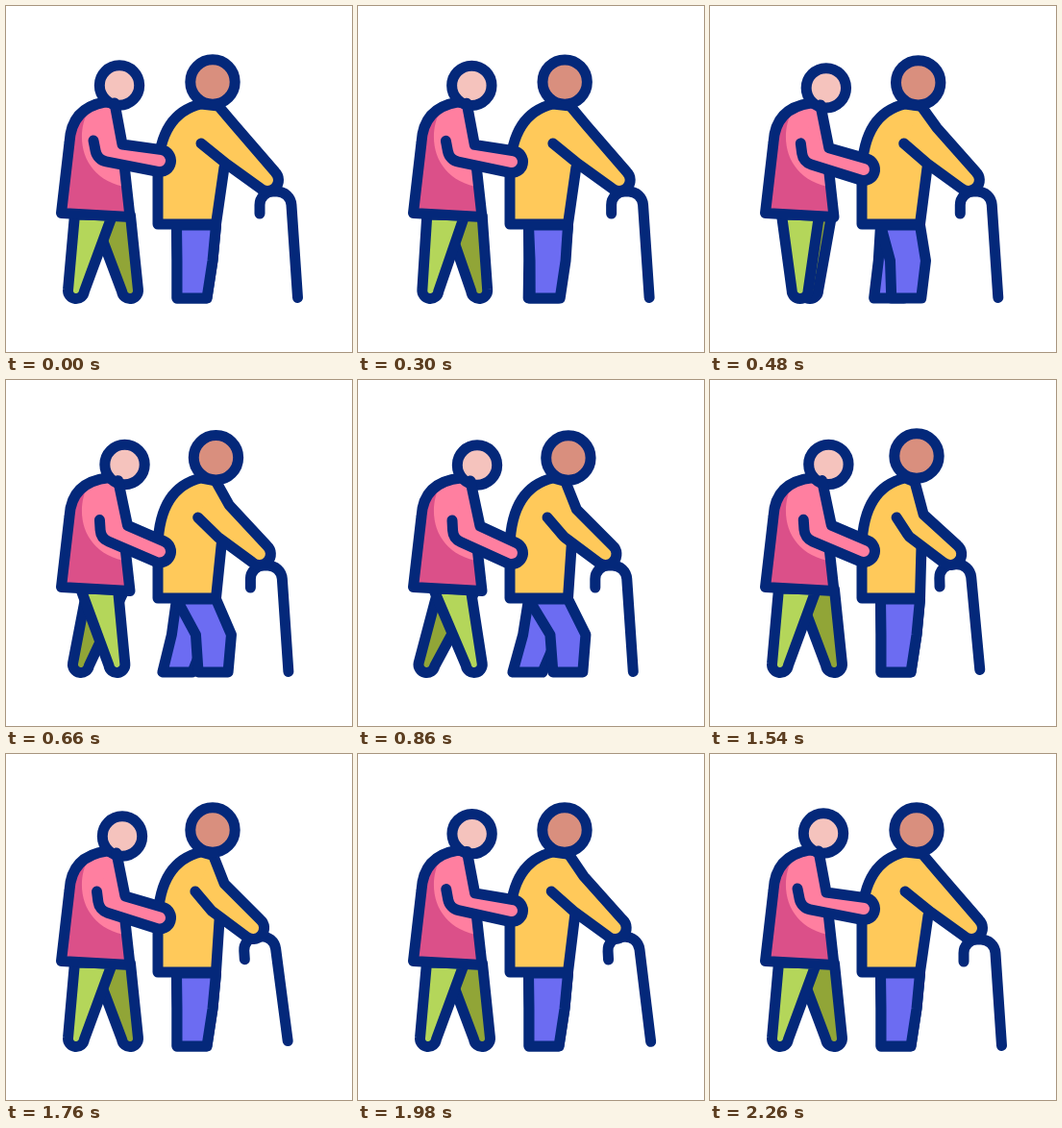
Animation, 360 px wide and 360 px high, one loop 2.4 s. Source, as an HTML page with a canvas:

```html
<!DOCTYPE html>
<html lang="en">
<head>
<meta charset="utf-8">
<title>Walking together</title>
<style>
html, body { margin: 0; width: 100%; height: 100%; overflow: hidden; background: #fff; }
canvas { display: block; width: 360px; height: 360px; }
</style>
</head>
<body>
<canvas id="stage" width="360" height="360"></canvas>
<script>
const ctx = document.getElementById('stage').getContext('2d');
const LOOP = 2400;
const INK = '#04287a', PINK = '#ff7fa0', ROSE = '#db5089', YELLOW = '#ffc95a',
  BLUE = '#6c6cf2', LIME = '#b4d65a', OLIVE = '#91a537',
  SKIN = '#f5c3bd', TAN = '#d98f7e';

const phase = (t, a, b) => Math.min(1, Math.max(0, (t - a) / (b - a)));
const ease = (t, a, b) => (1 - Math.cos(Math.PI * phase(t, a, b))) / 2;
// 0 to 1 over a..b, hold, back to 0 over c..d
const swing = (t, a, b, c, d) => ease(t, a, b) - ease(t, c, d);
const mix = (a, b, k) => a + (b - a) * k;
const pt = (x, y) => ({ x, y });
// Point (x, y) moved by k times (dx, dy)
const move = (x, y, dx, dy, k) => pt(x + dx * k, y + dy * k);

function paint(path, fill) {
  if (fill) {
    ctx.fillStyle = fill;
    ctx.fill(path);
  }
  ctx.stroke(path);
}

function polygon(points) {
  const p = new Path2D();
  for (const { x, y } of points) p.lineTo(x, y);
  p.closePath();
  return p;
}

function head({ x, y }, r, fill) {
  const p = new Path2D();
  p.arc(x, y, r, 0, Math.PI * 2);
  paint(p, fill);
}

// Coat from the front down, round the hem and up the curved back
function coat({ front, hemR, hemL, back, bulge, neck, shoulder }) {
  const p = new Path2D();
  for (const q of [front, hemR, hemL, back]) p.lineTo(q.x, q.y);
  p.quadraticCurveTo(bulge.x, bulge.y, neck.x, neck.y);
  p.lineTo(shoulder.x, shoulder.y);
  return p;
}

// Sleeve: inner seam from tip round the pit, round hand, outer edge to the shoulder
function arm({ tip, pit, hand, bend, shoulder }, fill) {
  const r = 11.5;
  const a = Math.atan2(hand.y - (pit.y + bend.y) / 2, hand.x - (pit.x + bend.x) / 2);
  const p = new Path2D();
  p.moveTo(tip.x, tip.y);
  p.arcTo(pit.x, pit.y, hand.x - r * Math.sin(a), hand.y + r * Math.cos(a), 14);
  p.arc(hand.x, hand.y, r, a + Math.PI / 2, a - Math.PI / 2, true);
  p.lineTo(bend.x, bend.y);
  p.lineTo(shoulder.x, shoulder.y);
  paint(p, fill);
}

// Tapered leg with a round foot
function slimLeg(hip, foot, fill) {
  const tilt = (foot - hip) / 160;
  const p = new Path2D();
  p.moveTo(hip - 19.5, 217);
  p.arc(foot, 296, 8.5, Math.PI - tilt, -tilt, true);
  p.lineTo(hip + 19.5, 218);
  p.closePath();
  paint(p, fill);
}

// Trouser leg bending at the knee
function wideLeg(knee, foot) {
  const joints = [[198, 228, 20.5], [knee, 265, 18.5], [foot, 304, 15.5]];
  const left = joints.map(([x, y, w]) => pt(x - w, y));
  const right = joints.map(([x, y, w]) => pt(x + w, y));
  paint(polygon([...left, ...right.reverse()]), BLUE);
}

function carer(step, lean) {
  slimLeg(mix(110, 103, step), mix(129, 70, step), OLIVE);
  slimLeg(mix(91, 98, step), mix(73, 122, step), LIME);

  const shoulder = move(113, 101, 4, 4, lean);
  const body = coat({
    front: pt(123, 165), hemR: pt(129, 219.5), hemL: pt(57.5, 215.5),
    back: pt(66, 142), bulge: pt(68, 106), neck: move(103, 100, 4, 2, lean), shoulder
  });
  ctx.fillStyle = ROSE;
  ctx.fill(body);
  ctx.save();
  ctx.clip(body);
  const light = new Path2D();
  light.moveTo(86, 90);
  light.lineTo(86, 108);
  light.bezierCurveTo(70, 138, 80, 182, 128, 189);
  light.lineTo(140, 90);
  ctx.fillStyle = PINK;
  ctx.fill(light);
  ctx.restore();
  paint(body);
  head(move(118, 82.5, 6, 6, lean), 20.7, SKIN);
  return shoulder;
}

function carerArm(shoulder, lean) {
  arm({
    tip: move(91, 140, 7, 6, lean), pit: move(95, 160, 4, 5, lean),
    hand: move(160, 161, 0, 19, lean), bend: move(121, 144, 6, 8, lean), shoulder
  }, PINK);
}

function cane(reach, turn) {
  ctx.save();
  ctx.translate(275 - 26 * reach, 185 - 3 * turn);
  ctx.rotate(-0.065 * turn);
  ctx.translate(-275, -185);
  const p = new Path2D();
  p.moveTo(264, 216);
  p.arcTo(264, 193, 280, 193, 14);
  p.arcTo(296, 193, 303.5, 303.5, 15);
  p.lineTo(303.5, 303.5);
  paint(p);
  ctx.restore();
}

function elder(step, reach) {
  wideLeg(mix(196.5, 190, step), mix(193.5, 176, step));
  wideLeg(mix(196.5, 219, step), mix(193.5, 219, step));

  const shoulder = move(221, 104, -8, 2, reach);
  paint(coat({
    front: move(227, 168, -7, 2, reach), hemR: pt(218.5, 227), hemL: pt(158, 227),
    back: pt(158, 172), bulge: pt(160, 112), neck: pt(203, 102), shoulder
  }), YELLOW);
  arm({
    tip: move(203, 143, -9, 0, reach), pit: move(229, 164, -22, -1, reach),
    hand: move(272, 181, -22, 0, reach), bend: move(238, 124, -16, 16, reach), shoulder
  }, YELLOW);
  head(move(215, 79, 4, 2, step), 23.2, TAN);
}

function draw(t) {
  const step = swing(t, 220, 800, 800, 1400);
  const lean = swing(t, 220, 760, 1380, 2140);
  const reach = swing(t, 220, 1280, 1500, 2180);
  const turn = Math.sin(Math.PI * phase(t, 1440, 2220));

  ctx.fillStyle = '#fff';
  ctx.fillRect(0, 0, 360, 360);
  ctx.strokeStyle = INK;
  ctx.lineWidth = 11;
  ctx.lineCap = ctx.lineJoin = 'round';

  const shoulder = carer(step, lean);
  cane(reach, turn);
  elder(step, reach);
  carerArm(shoulder, lean);
}

const start = performance.now();
function tick() {
  draw((performance.now() - start) % LOOP);
  requestAnimationFrame(tick);
}
tick();
</script>
</body>
</html>
```
